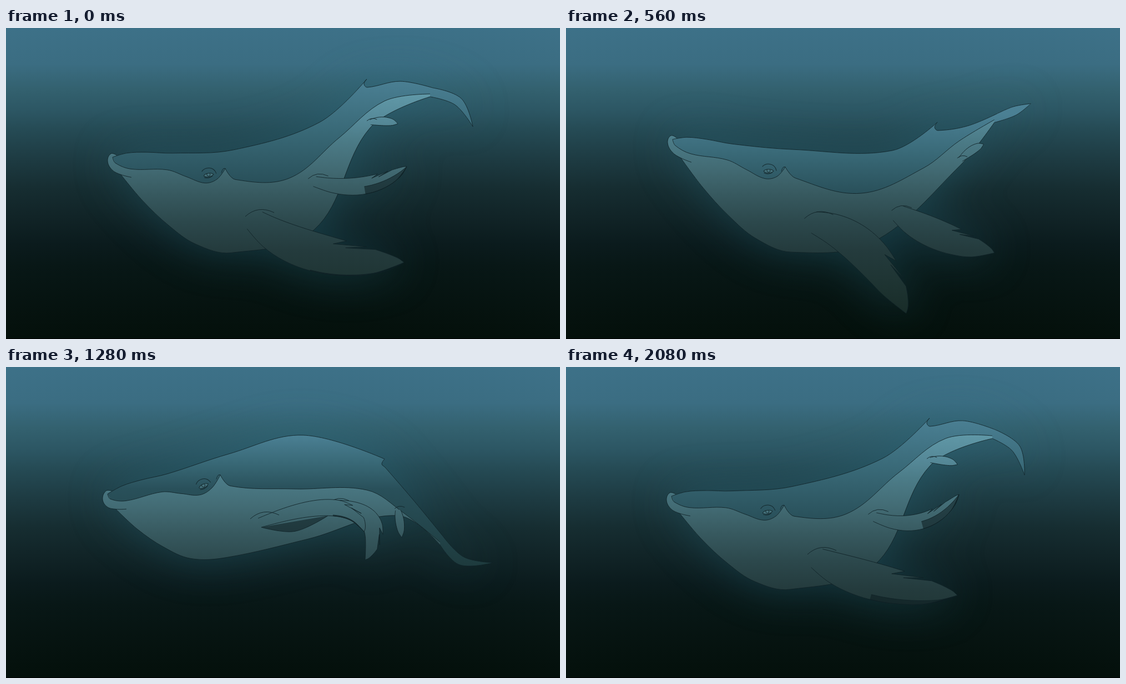
Animation, 998 px wide and 561 px high, one loop 2.12 s. Source, as an HTML page with a canvas:

```html
<!DOCTYPE html>
<html lang="en">
<head>
<meta charset="utf-8">
<title>Swimming whale</title>
<style>
html, body { margin: 0; width: 100%; height: 100%; overflow: hidden; background: #04100b; }
body {
  background: linear-gradient(#3d7188 0, #3b6d82 65px, #33616f 110px, #2c5663 150px, #254a54 185px,
    #1d3a41 240px, #162d31 290px, #112427 340px, #0b1b1d 390px, #081716 430px, #061310 500px, #04100b 560px, #000 560px);
}
canvas { display: block; }
</style>
</head>
<body>
<canvas id="sea" width="998" height="561"></canvas>
<script>
const ctx = document.getElementById("sea").getContext("2d");
const LOOP = 2120, STEPS = 32;
const KEYS = [0, 5, 11, 15, 19, 26, 31];

// A joint's path: cyclic cubic interpolation between its key positions.
function track(text) {
  const poses = text.split(" ").map(p => p.split(",").map(Number));
  const n = KEYS.length;
  const pose = i => poses[(i + n) % n];
  const time = i => KEYS[(i + n) % n] + STEPS * Math.floor(i / n);
  return step => {
    const i = KEYS.findLastIndex(k => k <= step);
    const span = time(i + 1) - time(i), u = (step - time(i)) / span;
    const slope = (j, c) => (pose(j + 1)[c] - pose(j - 1)[c]) / (time(j + 1) - time(j - 1)) * span;
    return pose(i).map((a, c) => {
      const b = pose(i + 1)[c], p = slope(i, c), q = slope(i + 1, c);
      return a + u * (p + u * (3 * (b - a) - 2 * p - q + u * (2 * (a - b) + p + q)));
    });
  };
}

const joints = {
  lip: track("192,233 194,210 189,196 185,205 183,229 181,237 190,233"),
  tilt: track("0.1 0.24 0.2 0 -0.17 0.01 0.08"),
  hump: track("565,170 578,205 585,223 520,158 535,123 535,147 570,165"),
  fin: track("650,92 660,127 678,209 684,208 682,166 683,102 655,92"),
  tail: track("769,108 780,109 776,212 805,283 787,305 776,176 773,113"),
  fluke: track("841,178 845,152 836,137 882,223 877,353 797,287 826,195"),
  loin: track("510,271 520,290 540,299 530,267 520,220 490,240 505,265"),
  flank: track("600,198 620,218 660,284 620,276 650,222 590,176 600,190"),
  hip: track("555,364 548,378 560,386 568,344 545,310 515,357 555,358"),
  hind: track("656,170 690,190 726,285 717,299 706,258 678,163 656,168"),
  hindTurn: track("3 -48 -4 45 82 43 9"),
  shoulder: track("448,347 451,354 443,343 454,321 457,281 462,322 452,345"),
  nearElbow: track("557,404 542,425 550,372 590,312 590,254 555,343 556,387"),
  nearTip: track("717,423 664,495 570,510 588,412 645,297 653,311 705,412"),
  farElbow: track("645,284 668,338 668,398 640,365 658,282 620,233 640,278"),
  farTip: track("722,250 771,354 751,446 655,458 647,348 694,212 708,230")
};

const SKIN = shade(0, 561, { 110: "#629baa", 170: "#558897", 200: "#4c7c88", 250: "#436c75", 300: "#37595f",
  350: "#2c484c", 400: "#243b3d", 450: "#1f3534", 510: "#192d29" });
const FOLD = "rgba(12,28,32,.55)", INK = "rgba(16,34,38,.85)", GLOW = "rgba(40,108,128,.4)";

function shade(top, end, stops) {
  const g = ctx.createLinearGradient(0, top, 0, end);
  for (const y in stops) g.addColorStop((y - top) / (end - top), stops[y]);
  return g;
}

const rev = pts => [...pts].reverse();
const add = ([x, y], dx, dy) => [x + dx, y + dy];
const between = (a, b, dy = 0) => [(a[0] + b[0]) / 2, (a[1] + b[1]) / 2 + dy];

// Smooth curve through the points; handles never outgrow their segment.
function curve(path, pts) {
  const dir = i => {
    if (i === 0 || i === pts.length - 1) return [0, 0];
    const dx = pts[i + 1][0] - pts[i - 1][0], dy = pts[i + 1][1] - pts[i - 1][1];
    const d = Math.hypot(dx, dy) || 1;
    return [dx / d, dy / d];
  };
  for (let i = 1; i < pts.length; i++) {
    const [ax, ay] = pts[i - 1], [bx, by] = pts[i];
    const h = Math.hypot(bx - ax, by - ay) * 0.35, p = dir(i - 1), q = dir(i);
    path.bezierCurveTo(ax + p[0] * h, ay + p[1] * h, bx - q[0] * h, by - q[1] * h, bx, by);
  }
}

// Smooth curves joined at corners.
function outline(...curves) {
  const path = new Path2D();
  curves.forEach((pts, i) => {
    path[i ? "lineTo" : "moveTo"](...pts[0]);
    curve(path, pts);
  });
  return path;
}

function paint(path, fill) {
  if (fill) {
    ctx.fillStyle = fill;
    ctx.fill(path);
  }
  ctx.stroke(path);
}

// A flipper: a bent spine with a width that swells and then tapers to the tip.
function limb(root, elbow, tip, width, notched) {
  const bend = [0, 1].map(c => 2 * elbow[c] - (root[c] + tip[c]) / 2);
  const at = (t, side) => {
    const u = 1 - t, half = side * width * u ** 0.7 * (0.45 + 1.6 * t);
    const [x, y] = [0, 1].map(c => u * u * root[c] + 2 * u * t * bend[c] + t * t * tip[c]);
    const [dx, dy] = [0, 1].map(c => u * (bend[c] - root[c]) + t * (tip[c] - bend[c]));
    const d = Math.hypot(dx, dy) || 1;
    return [x + dy / d * half, y - dx / d * half];
  };
  const edge = (side, a, b) => Array.from({ length: 7 }, (_, i) => at(a + (b - a) * i / 6, side));
  const low = edge(-1, 1, 0);
  const notch = [[at(0.6, 0.65)], [at(0.8, 1)], [at(0.68, 0.6)]];
  const shape = notched
    ? outline(edge(1, 0, 0.68), ...notch, edge(1, 0.85, 1), low)
    : outline(edge(1, 0, 1), low);
  return { at, edge, shape, root };
}

function drawLimb({ edge, shape, root: [x, y] }, size, fold) {
  paint(shape, SKIN);
  if (fold > 0) paint(outline(edge(-1, 0.5, 1), edge(fold - 1, 1, 0.5)), FOLD);
  const p = (dx, dy) => `${x + dx * size} ${y + dy * size}`;
  paint(new Path2D(`M${p(-17, -7)}Q${p(6, -28)} ${p(35, -14)}`));
}

function drawEye([x, y], tilt) {
  ctx.save();
  ctx.translate(x, y);
  ctx.rotate(tilt - 0.15);
  paint(new Path2D("M-12-7C-6-15 10-16 14-2"));
  paint(new Path2D("M-9 1C-6-4 5-5 9-1C5 4-4 5-9 1"), "#44707a");
  paint(new Path2D("M-3-3Q-4 2 1 2Q4 0 2-3M-8 4Q0 7 7 2"));
  ctx.restore();
}

function draw(step) {
  const j = {};
  for (const name in joints) j[name] = joints[name](step);
  const wave = (mean, swing, peak) => mean + swing * Math.cos((step / STEPS * 360 - peak) * Math.PI / 180);

  // The head keeps its shape and only shears with the tilt.
  const [tilt] = j.tilt;
  const head = (x, y) => [j.lip[0] + x, j.lip[1] + y + tilt * x];
  const cusp = head(203, 0);
  const lip = [head(8, -4), head(-3, -6), head(-9, 8), head(-1, 23), head(15, 30), head(34, 33)];
  const mouth = [j.lip, head(5, 10), head(33, 18), head(98, 13), head(133, 22), head(166, 30), head(188, 21), cusp];
  const back = [j.lip, head(26, -10), head(61, -15), head(108, -18), head(218, -35), j.hump, j.fin];

  const notch = add(j.fin, 1, 15), under = add(j.tail, -5, 16);
  const ridge = [j.fin, add(j.fin, -5, 9), notch, between(notch, j.tail, wave(-3, 13, 130)), j.tail];
  const stripeEnd = add(j.tail, -5, 11);
  const stripe = [cusp, add(cusp, 18, 20), j.loin, j.flank, between(j.flank, stripeEnd, wave(-13, 16, 150)), stripeEnd];
  const belly = [head(15, 30), head(54, 73), head(101, 113), head(150, 142), head(214, 151), j.hip, add(j.hind, 0, 10), under];

  // The fluke trails the tail and bows against the stroke.
  const [dx, dy] = [j.fluke[0] - j.tail[0], j.fluke[1] - j.tail[1]];
  const bow = side => {
    const h = (wave(-6, 20, 5) + side) / Math.hypot(dx, dy);
    return add(between(j.tail, j.fluke), dy * h, -dx * h);
  };
  const flukeOut = [j.tail, bow(8), j.fluke], flukeIn = [j.fluke, bow(-8), under];

  const farRoot = add(j.shoulder, wave(130, 31, 135), wave(-41, 38, 140));
  const near = limb(j.shoulder, j.nearElbow, j.nearTip, wave(34, 15, 40), true);
  const far = limb(farRoot, j.farElbow, j.farTip, wave(25, 11, 115), true);
  const turn = j.hindTurn[0] * Math.PI / 180, hindTip = add(j.hind, 50 * Math.cos(turn), 50 * Math.sin(turn));
  const hind = limb(j.hind, between(j.hind, hindTip, -3), hindTip, 10);

  const body = outline(back, ridge, flukeOut, flukeIn, rev(belly));
  const whole = new Path2D(body);
  [near, far].forEach(l => whole.addPath(l.shape));
  const top = Math.min(j.hump[1], j.fin[1], j.tail[1]), low = Math.max(j.loin[1], cusp[1] + 25);
  const BACK = shade(top, 430, { [top]: "#4b8094", [(top + low) / 2]: "#396977", [low]: "#29505a", 430: "#18302f" });

  ctx.clearRect(0, 0, 998, 561);
  ctx.lineJoin = "round";
  ctx.strokeStyle = INK;
  ctx.fillStyle = BACK;
  ctx.save();
  ctx.shadowColor = GLOW;
  ctx.shadowBlur = 80;
  ctx.fill(whole);
  ctx.restore();

  ctx.fill(body);
  ctx.fillStyle = SKIN;
  ctx.fill(outline(lip));
  ctx.fillStyle = BACK;
  ctx.fill(outline(back, ridge, rev(stripe), rev(mouth)));
  ctx.fillStyle = SKIN;
  ctx.fill(outline(mouth, stripe, rev(belly)));

  paint(outline(flukeOut, flukeIn), BACK);
  [[back, ridge], [mouth, stripe], [belly], [lip]].forEach(c => paint(outline(...c)));
  paint(outline([add(cusp, -7, 8), add(cusp, -4, 1), cusp]));
  drawEye(head(173, 15), tilt);

  drawLimb(hind, 0.35, 0);
  drawLimb(far, 0.7, wave(0, 1, 330));

  // The near flipper shows its dark underside while it is swept back.
  const sweep = wave(-8, 46, 195);
  if (sweep > 0) {
    const a = near.at(0, -1), b = near.at(0.45, -1);
    paint(outline([a, between(a, b, sweep / 2), b]), FOLD);
  }
  drawLimb(near, 1, wave(-0.3, 1.3, 285));
}

// Drawings are held for 80, 80 and 40 ms in turn.
function stepAt(ms) {
  if (ms < 160) return ms < 80 ? 0 : 1;
  const u = ms - 160, r = u % 200;
  return 2 + 3 * Math.floor(u / 200) + (r >= 80) + (r >= 120);
}

const start = performance.now();
let shown = -1;
function tick() {
  const step = stepAt(Math.max(0, performance.now() - start) % LOOP);
  if (step !== shown) draw(shown = step);
  requestAnimationFrame(tick);
}
tick();
</script>
</body>
</html>
```
